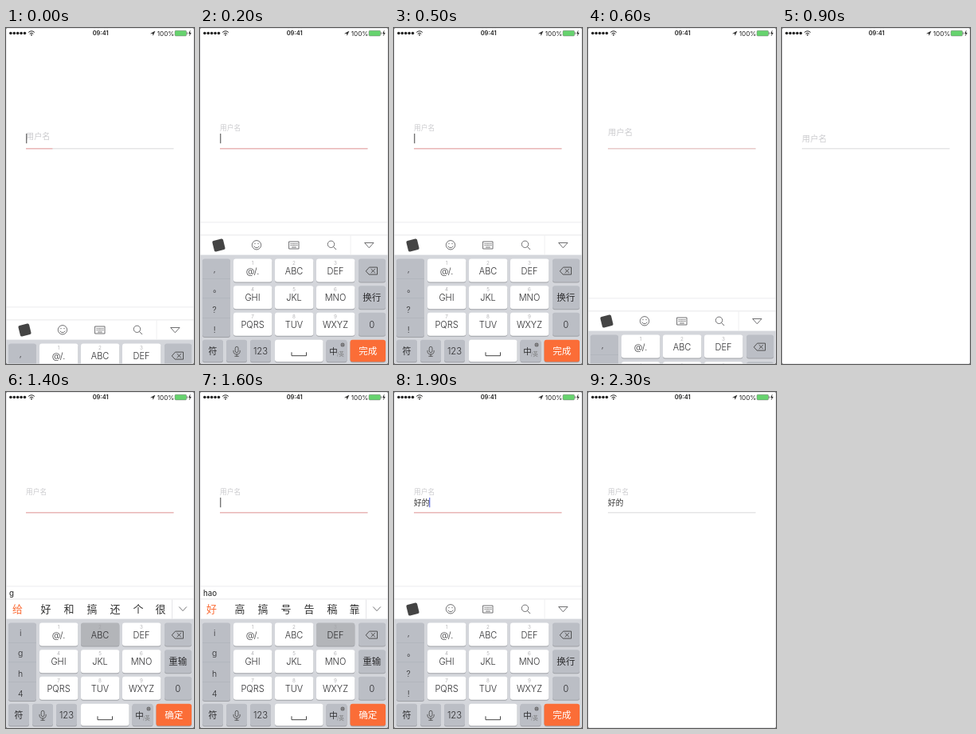
An HTML page for the animation above (2400 ms loop, 236 by 420 pixels).

```html
<!DOCTYPE html>
<html lang="zh">
<head>
<meta charset="utf-8">
<title>Floating label field</title>
<style>
html, body { margin: 0; width: 100%; height: 100%; overflow: hidden; background: #fff; }
svg { display: block; width: 236px; height: 420px; }
text { font-family: Inter, "Noto Sans CJK SC", "Noto Sans CJK", sans-serif; white-space: pre; }
.key { font-weight: 300; }
</style>
</head>
<body>
<svg id="stage" viewBox="0 0 236 420"></svg>
<script>
const LOOP = 2400, STEP = 100, TRAVEL = 177;
const GRAY = '#bbbec5', INK = '#2c2c2e', ICON = '#606062', ORANGE = '#fb6d37';
const stage = document.getElementById('stage');

function add(parent, tag, attrs, content) {
  const el = document.createElementNS('http://www.w3.org/2000/svg', tag);
  for (const k in attrs) el.setAttribute(k, attrs[k]);
  if (content !== undefined) el.textContent = content;
  parent.appendChild(el);
  return el;
}
const rect = (p, x, y, width, height, fill, rx = 0) => add(p, 'rect', { x, y, width, height, fill, rx });
const path = (p, d, stroke = ICON, width = 0.9, fill = 'none') =>
  add(p, 'path', { d, stroke, 'stroke-width': width, fill, 'stroke-linecap': 'round', 'stroke-linejoin': 'round' });
const circle = (p, cx, cy, r, fill, stroke = 'none') => add(p, 'circle', { cx, cy, r, fill, stroke, 'stroke-width': 0.9 });
// y is the visual middle of the line
function text(p, x, y, s, size, fill = INK, anchor = 'middle', extra = {}) {
  return add(p, 'text', { x, y: y + size * 0.36, 'font-size': size, fill, 'text-anchor': anchor, ...extra }, s);
}
const show = (el, on) => el.setAttribute('display', on ? 'inline' : 'none');
const put = (el, s) => { if (el.textContent !== s) el.textContent = s; };

rect(stage, 0, 0, 236, 420, '#fff');

// status bar
for (let i = 0; i < 5; i++) circle(stage, 5.9 + i * 4.4, 6.5, 1.8, '#222');
path(stage, 'M28.5 5.2Q32 2.2 35.5 5.2M30 7Q32 5.2 34 7', '#222', 1);
circle(stage, 32, 8.7, 0.9, '#222');
text(stage, 118.7, 6.6, '09:41', 7.5, '#222', 'middle', { 'font-weight': 600 });
path(stage, 'M182 6.8L187 4L184.6 9.2L184.4 6.9Z', '#222', 0.4, '#222');
text(stage, 200.5, 6.6, '100%', 8.2, '#222');
add(stage, 'rect', { x: 212, y: 3.3, width: 14.5, height: 6.6, rx: 1.2, fill: '#66d36e', stroke: '#777', 'stroke-width': 0.5 });
rect(stage, 227, 5.4, 0.9, 2.4, '#777');
path(stage, 'M231.2 3.4L229.3 6.9H231L230.2 9.8L232.4 6H230.8Z', '#222', 0.3, '#222');

// field
const label = text(stage, 25, 125, '用户名', 8.7, '#cbcbce', 'start');
const value = text(stage, 25, 138.6, '好的', 9.7, '#333', 'start', { 'font-weight': 300 });
rect(stage, 25, 150.4, 185.5, 0.9, '#d4d4d6');
const line = rect(stage, 25, 150.4, 185.5, 0.9, '#ee9a98');
const caret = rect(stage, 25.2, 132, 1.1, 12.2, '#555');

// keyboard
const board = add(stage, 'g', {});
rect(board, 0, 242.5, 236, 42, '#fff');
rect(board, 0, 242.5, 236, 0.8, '#e8e8ea');
rect(board, 0, 258.5, 236, 0.8, '#e2e2e4');
rect(board, 0, 283.6, 236, 138, '#d4d6db');

const tools = add(board, 'g', {});
rect(tools, 16.5, 264.5, 14, 14, '#444', 2).setAttribute('transform', 'rotate(-14 23.5 271.5)');
circle(tools, 71, 271.3, 5.7, 'none', ICON);
path(tools, 'M67.8 273Q71 276.8 74.2 273');
circle(tools, 69, 269.6, 0.7, ICON);
circle(tools, 73, 269.6, 0.7, ICON);
path(tools, 'M112 267H124V276H112Z');
path(tools, 'M114 269.6H122M114 271.6H122').setAttribute('stroke-dasharray', '0.9 1.5');
path(tools, 'M115.5 274H120.5');
circle(tools, 164.5, 270.3, 4.2, 'none', ICON);
path(tools, 'M167.6 273.5L170.8 276.8');
rect(tools, 188.7, 259.5, 0.7, 24, '#e8e8ea');
path(tools, 'M207 268.5H218L212.5 274.5Z');

const picks = add(board, 'g', {});
const pinyin = text(picks, 4, 251.3, '', 9.8, '#222', 'start');
const words = text(picks, 0, 271.2, '', 13, '#333', 'start', { 'font-weight': 300 });
rect(picks, 208, 259.5, 0.7, 24, '#dcdcde');
path(picks, 'M217.5 268.8L222 273.6L226.5 268.8');

function key(x, y, w, h, fill) {
  rect(board, x, y + 1, w, h, '#9fa1a6', 3);
  return rect(board, x, y, w, h, fill, 3);
}
const keyText = (x, y, s, size, fill) => text(board, x, y, s, size, fill, 'middle', { class: 'key' });

const ROW = 33.6, TOP = 288.6;
key(3, TOP, 35, 97.5, GRAY);
for (let i = 1; i < 4; i++) rect(board, 3, TOP + i * 24.5, 35, 0.5, '#a9adb5');
const side = [0, 1, 2, 3].map(i => keyText(18.2, 301.2 + i * 25.3, '', 10.5));

const pads = {};
['@/.', 'ABC', 'DEF', 'GHI', 'JKL', 'MNO', 'PQRS', 'TUV', 'WXYZ'].forEach((s, i) => {
  const x = 42 + (i % 3) * 52, y = TOP + Math.floor(i / 3) * ROW;
  pads[s] = key(x, y, 48.3, 29, '#fff');
  keyText(x + 24, y + 4.8, i + 1, 6.3, '#a0a0a4');
  keyText(x + 24, y + 15.1, s, 11);
});

for (let i = 0; i < 3; i++) key(199, TOP + i * ROW, 34, 29, GRAY);
path(board, 'M208.5 303.6L212.5 299.1H222.5V308.1H212.5Z', '#444');
path(board, 'M215 301.5L219.5 305.8M219.5 301.5L215 305.8', '#444');
const wrap = keyText(215.7, 337.3, '', 11.5);
keyText(215.7, 371.3, '0', 11.3);

[3, 33, 63].forEach(x => key(x, 389.8, 26, 27.5, GRAY));
keyText(16, 404.2, '符', 11);
path(board, 'M44.2 400.2Q44.2 398.3 46.1 398.3Q48 398.3 48 400.2V403.8Q48 405.7 46.1 405.7Q44.2 405.7 44.2 403.8Z', '#444', 0.8);
path(board, 'M42 403.3V404Q42 407.9 46.1 407.9Q50.2 407.9 50.2 404V403.3M46.1 408V410.3M43.8 410.3H48.4', '#444', 0.8);
keyText(76, 404, '123', 11.3);
key(94, 389.8, 60.5, 27.5, '#fff');
path(board, 'M115 405.7V409.7H133.5V405.7', '#444', 1);
key(158.5, 389.8, 26, 27.5, GRAY);
keyText(167.5, 404.2, '中', 10.5);
keyText(176.5, 408, '/英', 6.5, '#777');
circle(board, 179, 396, 2.5, '#666');
path(board, 'M176.7 396H181.3M179 393.7V398.3', GRAY, 0.4);
key(188.5, 389.8, 44.5, 27.5, ORANGE);
const done = keyText(210.7, 404, '', 11.5, '#fff');

// screen edge
add(stage, 'path', { d: 'M0 0H236V420H0ZM2 0Q0 0 0 2V418Q0 420 2 420H234Q236 420 236 418V2Q236 0 234 0Z', fill: '#555', 'fill-rule': 'evenodd' });
add(stage, 'rect', { x: 0.4, y: 0.4, width: 235.2, height: 419.2, rx: 2, fill: 'none', stroke: '#dcdcde', 'stroke-width': 0.7 });

// typing: start, pressed key, pinyin, candidates
const typing = [
  [1300, 'GHI', 'g', '给 好 和 搞 还 个 很'],
  [1400, 'ABC', 'g', '给 好 和 搞 还 个 很'],
  [1500, 'MNO', 'ha', '哈 啊 爱 嘎 改 该 海'],
  [1600, 'DEF', 'hao', '好 高 搞 号 告 稿 靠'],
  [1700, 'DEF', "hao'de", '好的 好 高 搞 号 告'],
  [1800, '', "hao'de", '好的 好 高 搞 号 告']
];
const slots = [14.5, 50, 79, 108, 137, 166, 194];

function setWords(list) {
  words.textContent = '';
  const all = list.split(' '), shift = all[0].length > 1 ? 6 : 0;
  all.forEach((w, i) => add(words, 'tspan', {
    x: slots[i] + shift, 'text-anchor': 'middle', fill: i ? '#333' : ORANGE
  }, w));
}

// share of a critically damped spring still to go after ms
function rest(ms) {
  if (ms <= 0) return 1;
  if (ms >= 240) return 0;
  const a = ms * 0.03;
  return (1 + a) * Math.exp(-a);
}
const clamp = v => Math.max(0, Math.min(1, v));
const smooth = v => (v = clamp(v), v * v * (3 - 2 * v));

function draw(t) {
  const blurAt = 540, refocusAt = 910, endAt = 2000;
  const second = t >= refocusAt, ended = t >= endAt;
  const leaving = t > blurAt && !second;
  const since = second ? t - refocusAt : t + 46;

  let hidden = leaving ? 1 - rest(t - blurAt) : rest(since);
  if (ended) hidden = 1;
  board.setAttribute('transform', `translate(0 ${Math.round(hidden * TRAVEL)})`);
  show(board, hidden < 1);

  const focus = smooth(since / 170);
  const out = clamp((t - blurAt) / 150);
  const lift = leaving ? 1 - out : focus;
  const size = leaving ? 10.4 : 10.5 - 1.8 * focus;
  label.setAttribute('font-size', size);
  label.setAttribute('y', 138 - 13 * lift + size * 0.36);

  line.setAttribute('width', leaving ? 185.5 : 185.5 * focus);
  line.setAttribute('opacity', ended ? 0 : leaving ? 1 - out : 1);

  const typed = t >= 1900;
  show(value, typed);
  show(caret, !leaving && !ended && !(t >= 1300 && t < 1500));
  caret.setAttribute('x', typed ? 44.2 : 25.2);
  caret.setAttribute('fill', typed ? '#5563e2' : '#555');

  const now = typed ? null : typing.filter(s => t >= s[0]).pop();
  show(tools, !now);
  show(picks, now);
  if (now) {
    put(pinyin, now[2]);
    setWords(now[3]);
  }
  [...(now ? 'igh4' : ',。?!')].forEach((c, i) => {
    put(side[i], c);
    side[i].setAttribute('x', c === '。' ? 21.5 : 18.2);
  });
  for (const k in pads) pads[k].setAttribute('fill', now && now[1] === k ? '#b3b5b9' : '#fff');
  put(wrap, now ? '重输' : '换行');
  put(done, now ? '确定' : '完成');
}

function tick() {
  const t = performance.now() % LOOP;
  draw(Math.floor(t / STEP) * STEP);
  requestAnimationFrame(tick);
}
tick();
</script>
</body>
</html>
```
